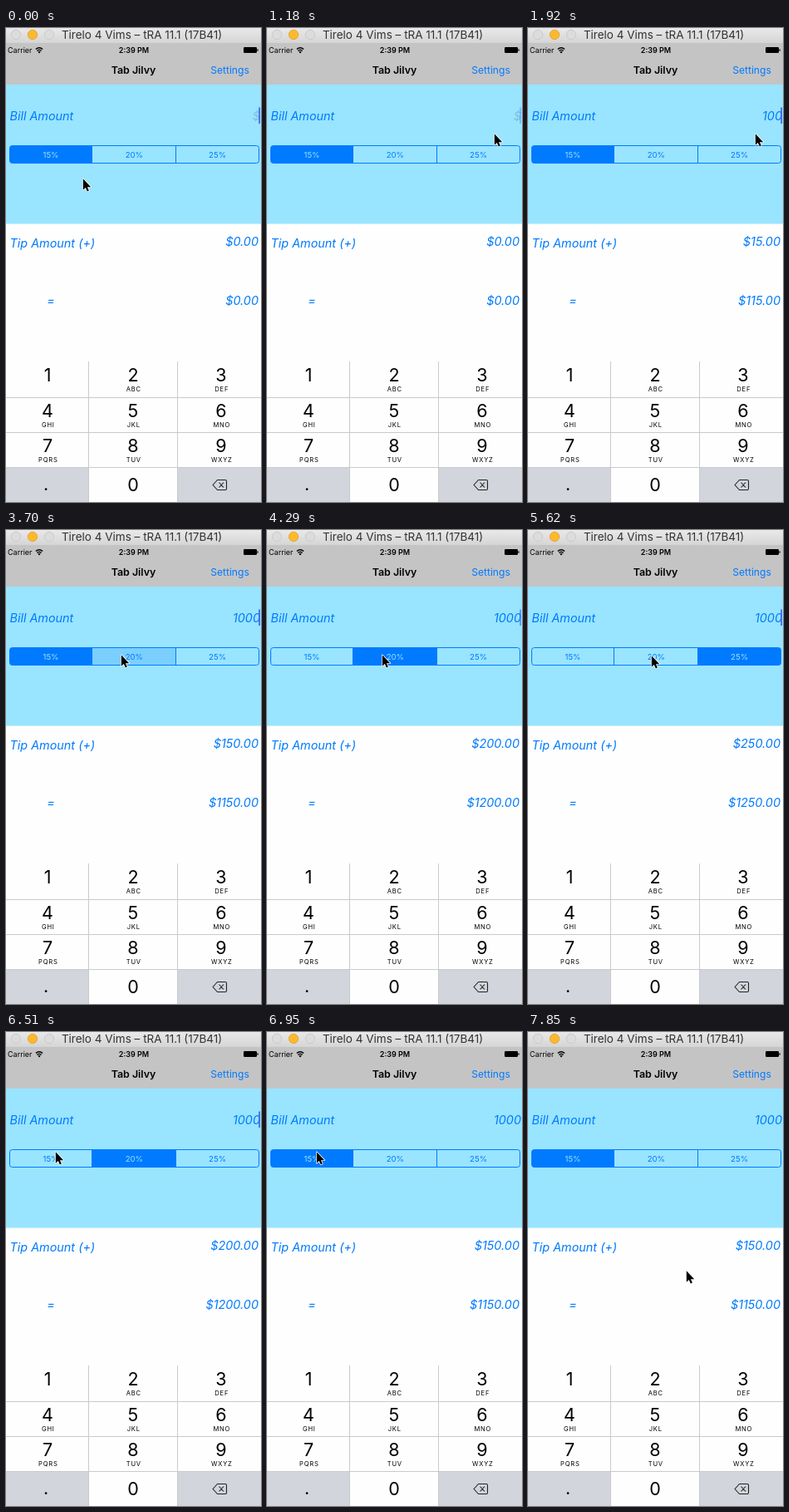
Write an HTML page that moves like this. It is 307 by 570 pixels and loops after 8 s.

```html
<!DOCTYPE html>
<html lang="en">
<head>
<meta charset="utf-8">
<title>Tip calculator</title>
<style>
  html, body { margin: 0; width: 100%; height: 100%; overflow: hidden; background: #fefefe; }
  svg { display: block; width: 100%; height: 100%; font-family: Inter, Roboto, sans-serif; }
  .mid { text-anchor: middle; }
  .end { text-anchor: end; }
  .blue { fill: #007aff; }
  .field { font-size: 14.4px; font-style: italic; }
  .seg { font-size: 9.6px; }
  .digit { font-size: 21.5px; }
  .letters { font-size: 7.6px; letter-spacing: .8px; }
</style>
</head>
<body>
<svg viewBox="0 0 307 570">
  <defs>
    <linearGradient id="bar" x2="0" y2="1">
      <stop stop-color="#e9e9e9"/><stop offset="1" stop-color="#d5d5d5"/>
    </linearGradient>
    <clipPath id="round"><rect x="4.5" y="141.5" width="300" height="21" rx="3"/></clipPath>
  </defs>

  <!-- window bar -->
  <rect width="307" height="18" fill="url(#bar)"/>
  <g stroke-width=".8">
    <circle cx="12" cy="8" r="5.7" fill="#dcdcdc" stroke="#c6c6c6"/>
    <circle cx="32" cy="8" r="5.7" fill="#fdb92d" stroke="#e0a02c"/>
    <circle cx="52" cy="8" r="5.7" fill="#dcdcdc" stroke="#c6c6c6"/>
  </g>
  <text class="mid" x="163.5" y="13" font-size="13.5" fill="#333">Tirelo 4 Vims – tRA 11.1 (17B41)</text>

  <!-- status and navigation -->
  <rect y="18" width="307" height="50" fill="#c4c4c4"/>
  <text x="2" y="30" font-size="9">Carrier</text>
  <path d="M35.8 25.6Q40 21.8 44.2 25.6M37.4 27.5Q40 25.2 42.6 27.5" fill="none" stroke="#000" stroke-width="1.3"/>
  <path d="M38.3 28.7Q40 27.3 41.7 28.7L40 30.5Z"/>
  <text class="mid" x="154" y="30" font-size="9" font-weight="600">2:39 PM</text>
  <rect x="286" y="23" width="16" height="7" rx="1.2"/>
  <rect x="302.4" y="25.2" width="1.2" height="2.6" rx=".6"/>
  <text class="mid" x="153.5" y="55" font-size="12.4" font-weight="600">Tab Jilvy</text>
  <text class="blue mid" x="269.5" y="55" font-size="12.1">Settings</text>

  <!-- bill panel -->
  <rect y="68" width="307" height="167.5" fill="#99e4ff"/>
  <text class="field blue" x="4.5" y="110.5">Bill Amount</text>
  <text class="field end" id="bill" x="306" y="110.5"></text>
  <rect id="caret" x="304.2" y="95.5" width="1.8" height="19.5" fill="#426bf2"/>
  <g id="segments"></g>
  <path d="M103.5 142V162M204.5 142V162" stroke="#007aff"/>
  <rect x="4.5" y="141.5" width="300" height="21" rx="3" fill="none" stroke="#007aff"/>

  <!-- results -->
  <text class="field blue" x="4.5" y="263.5">Tip Amount (+)</text>
  <text class="field blue end" id="tip" x="304" y="262"></text>
  <text class="field blue mid" x="54" y="333">=</text>
  <text class="field blue end" id="total" x="304" y="332.5"></text>

  <!-- keypad -->
  <path d="M0 529H99V570H0ZM207 529H307V570H207Z" fill="#d2d5db"/>
  <path d="M99.5 401V570M206.5 401V570M0 444.5H307M0 486.5H307M0 528.5H307" stroke="#c9cacd"/>
  <g id="keys"></g>
  <path d="M254.5 543.5H264Q265.5 543.5 265.5 545V554Q265.5 555.5 264 555.5H254.5L249 549.5ZM256.5 546.5L262 552.5M262 546.5L256.5 552.5" fill="none" stroke="#222" stroke-width="1.1" stroke-linejoin="round"/>

  <g id="cursor">
    <path transform="translate(.8 1.3) scale(.84)" d="M0 0V16L3.6 12.7L6 18L8.4 17L6.1 11.7H11.2Z" stroke="#fff" stroke-width="1.8" stroke-linejoin="round" paint-order="stroke"/>
  </g>
</svg>
<script>
const LOOP = 8000, TICK = 148;
const RATES = [15, 20, 25];
const $ = id => document.getElementById(id);
const clamp = (v, lo = 0, hi = 1) => Math.min(hi, Math.max(lo, v));
const ease = u => u * u * (3 - 2 * u);

// Pointer moves in ticks; some end with a tap on a segment.
const moves = [
  { from: 0, to: 2, x: 273, y: 126 },
  { from: 19, to: 23, x: 138, y: 149, tap: 25, segment: 1 },
  { from: 29, to: 33, x: 258, y: 153, tap: 33, segment: 2 },
  { from: 36, to: 38, x: 148, y: 150, tap: 39, segment: 1 },
  { from: 40, to: 44, x: 59, y: 143, tap: 45, segment: 0 },
  { from: 50, to: 53, x: 190, y: 286 }
];

function add(parent, tag, attrs, text = '') {
  const el = document.createElementNS('http://www.w3.org/2000/svg', tag);
  for (const name in attrs) el.setAttribute(name, attrs[name]);
  el.textContent = text;
  return parent.appendChild(el);
}

const segments = RATES.map((rate, i) => ({
  box: add($('segments'), 'rect', { x: 3.5 + i * 100.5, y: 141, width: 100.5, height: 22, fill: '#007aff', 'clip-path': 'url(#round)' }),
  label: add($('segments'), 'text', { class: 'seg mid', x: 54 + i * 100.3, y: 155.5 }, rate + '%')
}));

const columns = [50, 153, 259];
['', 'ABC', 'DEF', 'GHI', 'JKL', 'MNO', 'PQRS', 'TUV', 'WXYZ'].forEach((letters, i) => {
  const x = columns[i % 3], y = Math.round(425 + Math.floor(i / 3) * 42.5);
  add($('keys'), 'text', { class: 'digit mid', x, y }, i + 1);
  add($('keys'), 'text', { class: 'letters mid', x: x + .8, y: y + 11.5 }, letters);
});
add($('keys'), 'text', { class: 'digit mid', x: 153, y: 557 }, '0');
add($('keys'), 'text', { class: 'digit mid', x: 48, y: 556 }, '.');

function cursorAt(tick) {
  let x = 92, y = 180;
  for (const m of moves) {
    const u = ease(clamp((tick - m.from) / (m.to - m.from)));
    x += (m.x - x) * u;
    y += (m.y - y) * u;
  }
  return [x, y];
}

// The caret blinks about once a second and stays lit while typing.
function caretAt(t) {
  const start = t < 1300 ? 100 : 2750;
  if (t < start) return 1;
  const phase = (t - start) % 990;
  return clamp(phase < 300 ? 1 - phase / 150 : (phase - 450) / 150);
}

// The segment tapped most recently, at least `delay` ticks ago.
const tapped = (tick, delay) =>
  moves.findLast(m => m.tap + delay <= tick)?.segment ?? 0;

function draw(t) {
  const tick = Math.floor((t + 10) / TICK);
  const typed = clamp(Math.floor((tick - 7) / 2), 0, 4);
  const bill = Number('1000'.slice(0, typed));
  const tip = bill * RATES[tapped(tick, 1)] / 100;
  const pressed = tapped(tick, 0), selected = tapped(tick, 2);

  $('bill').textContent = bill || '$';
  $('bill').setAttribute('fill', bill ? '#007aff' : '#7fbfda');
  $('tip').textContent = '$' + tip.toFixed(2);
  $('total').textContent = '$' + (bill + tip).toFixed(2);
  $('caret').setAttribute('opacity', caretAt(tick * TICK));
  $('cursor').setAttribute('transform', `translate(${cursorAt(tick)})`);
  segments.forEach(({ box, label }, i) => {
    box.setAttribute('opacity', i === selected ? 1 : i === pressed ? .2 : 0);
    label.setAttribute('fill', i === selected ? '#99e4ff' : '#007aff');
  });
}

function frame() {
  draw(performance.now() % LOOP);
  requestAnimationFrame(frame);
}
frame();
</script>
</body>
</html>
```
